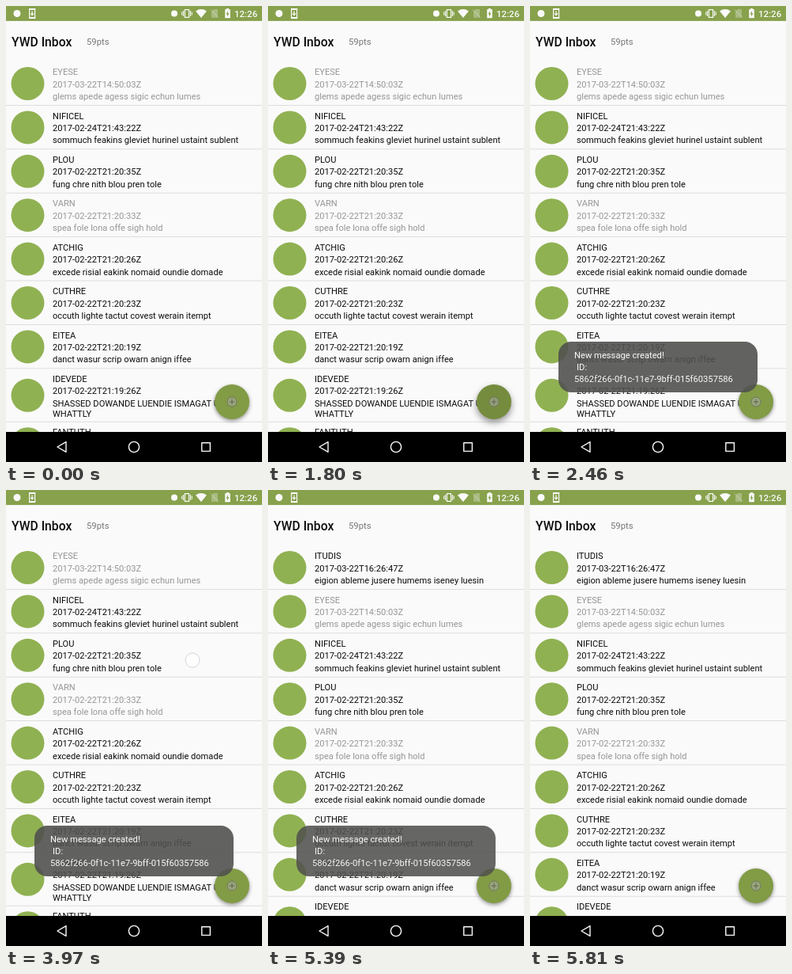
An HTML page with a canvas for the animation above (5860 ms loop, 324 px wide and 576 px high).

```html
<!DOCTYPE html>
<html lang="en">
<head>
<meta charset="utf-8">
<title>Inbox</title>
<style>
html, body { margin: 0; width: 100%; height: 100%; overflow: hidden; background: #fafafa; }
canvas { display: block; width: 100%; height: 100%; }
</style>
</head>
<body>
<canvas id="stage"></canvas>
<script>
const W = 324, H = 576, LOOP = 5860;
const LIST_TOP = 66, ROWS_TOP = 70, ROW_H = 55.4, NAV_TOP = 538;
const BG = '#fafafa', INK = '#0c0c0c', FADED = '#969696', GREEN = '#87a14c', LIGHT = '#fafafa';
const FONT = 'Roboto, sans-serif';

const canvas = document.getElementById('stage');
const ctx = canvas.getContext('2d');

const fresh = { name: 'ITUDIS', date: '2017-03-22T16:26:47Z', lines: ['eigion ableme jusere humems iseney luesin'] };
const rows = [
  { name: 'EYESE', date: '2017-03-22T14:50:03Z', lines: ['glems apede agess sigic echun lumes'], faded: true },
  { name: 'NIFICEL', date: '2017-02-24T21:43:22Z', lines: ['sommuch feakins gleviet hurinel ustaint sublent'] },
  { name: 'PLOU', date: '2017-02-22T21:20:35Z', lines: ['fung chre nith blou pren tole'] },
  { name: 'VARN', date: '2017-02-22T21:20:33Z', lines: ['spea fole lona offe sigh hold'], faded: true },
  { name: 'ATCHIG', date: '2017-02-22T21:20:26Z', lines: ['excede risial eakink nomaid oundie domade'] },
  { name: 'CUTHRE', date: '2017-02-22T21:20:23Z', lines: ['occuth lighte tactut covest werain itempt'] },
  { name: 'EITEA', date: '2017-02-22T21:20:19Z', lines: ['danct wasur scrip owarn anign iffee'] },
  { name: 'IDEVEDE', date: '2017-02-22T21:19:26Z', lines: ['SHASSED DOWANDE LUENDIE ISMAGAT UNDERIL', 'WHATTLY'] },
  { name: 'FANTUTH', date: '2017-02-22T21:19:20Z', lines: ['prent olame sigic'] }
];

const clamp = v => Math.max(0, Math.min(1, v));
const span = (t, a, b) => clamp((t - a) / (b - a));
const easeInOut = p => (1 - Math.cos(Math.PI * p)) / 2;
const easeIn = p => p * p;
const easeOut = p => 1 - (1 - p) ** 2;
const mix = (a, b, p) => a + (b - a) * p;

function text(str, x, y, size, color, weight = 400) {
  ctx.font = `${weight} ${size}px ${FONT}`;
  ctx.fillStyle = color;
  ctx.fillText(str, x, y);
}

function rect(x, y, w, h, color) {
  ctx.fillStyle = color;
  ctx.fillRect(x, y, w, h);
}

function disc(x, y, r, color) {
  ctx.fillStyle = color;
  ctx.beginPath();
  ctx.arc(x, y, r, 0, 2 * Math.PI);
  ctx.fill();
}

function arc(x, y, r, color, width, from = 0, to = 2 * Math.PI) {
  ctx.strokeStyle = color;
  ctx.lineWidth = width;
  ctx.beginPath();
  ctx.arc(x, y, r, from, to);
  ctx.stroke();
}

function path(points, closed) {
  ctx.beginPath();
  points.forEach(([x, y]) => ctx.lineTo(x, y));
  if (closed) ctx.closePath();
}

function line(points, color, width, closed = false) {
  ctx.strokeStyle = color;
  ctx.lineWidth = width;
  path(points, closed);
  ctx.stroke();
}

function layer(draw) {
  ctx.save();
  draw();
  ctx.restore();
}

function shadow(color, blur, dy) {
  const k = canvas.width / W;
  ctx.shadowColor = color;
  ctx.shadowBlur = blur * k;
  ctx.shadowOffsetY = dy * k;
}

function drawRow(row, top) {
  const height = ROW_H + (row.lines.length - 1) * 12;
  const color = row.faded ? FADED : INK;
  disc(27.5, top + height / 2 + 0.3, 21, '#90b152');
  text(row.name, 59, top + 17.2, 11.1, color);
  text(row.date, 59, top + 32.6, 11.1, color);
  row.lines.forEach((s, i) => text(s, 59, top + 48 + i * 13, 11.1, color));
  rect(0, top + height - 0.4, W, 0.8, '#d6d6d8');
  return top + height;
}

// Rows slide down first, then the new one fades into the gap.
function drawList(t) {
  const shift = easeInOut(span(t, 4570, 4820));
  const alpha = span(t, 4820, 4940);
  if (alpha > 0) layer(() => {
    ctx.globalAlpha = alpha;
    drawRow(fresh, ROWS_TOP);
  });
  let top = ROWS_TOP + shift * ROW_H;
  for (const row of rows) top = drawRow(row, top);
}

function drawSpinner(t) {
  const scale = 1 - span(t, 4550, 4700);
  if (t < 4010 || scale <= 0) return;
  const pull = easeInOut(span(t, 4010, 4290));
  const y = mix(48, 120, pull) - 14 * easeOut(span(t, 4300, 4500));
  ctx.translate(162, y);
  ctx.scale(scale, scale);
  layer(() => {
    shadow('rgba(0,0,0,.25)', 3, 1);
    disc(0, 0, 15.8, LIGHT);
  });
  const turn = -1.9 + (t - 4510) / 180;
  arc(0, 0, 7, '#bdbdbd', 2, turn, turn + 5.2 * Math.max(0.05, pull));
}

function drawFab(t) {
  const press = span(t, 1460, 1620) * (1 - span(t, 1800, 2010));
  const x = 286, y = 500, r = 22;
  layer(() => {
    shadow('rgba(0,0,0,.42)', 5 + 4 * press, 2 + 2 * press);
    disc(x, y, r, '#829b45');
  });
  if (press > 0) layer(() => {
    ctx.globalAlpha = 0.1 * press;
    disc(x, y, r * easeOut(span(t, 1460, 1700)), '#000');
  });
  disc(x, y, 6, 'rgba(175,178,172,.5)');
  arc(x, y, 6, '#70766a', 1);
  line([[x - 3.2, y], [x + 3.2, y]], '#666c60', 1.2);
  line([[x, y - 3.2], [x, y + 3.2]], '#666c60', 1.2);
}

function drawTouch(x, y, alpha) {
  if (alpha <= 0) return;
  layer(() => {
    ctx.globalAlpha = alpha;
    disc(x, y, 9, 'rgba(255,255,255,.75)');
    arc(x, y, 9, '#cfcfda', 0.9);
  });
}

function drawTouches(t) {
  if (t >= 1460 && t < 1620) drawTouch(287, 501, 0.6 * (1 - span(t, 1560, 1620)));
  if (t >= 3970 && t < 4340) {
    const y = mix(215, 345, easeInOut(span(t, 3970, 4290)));
    drawTouch(236, y, 1 - span(t, 4290, 4340));
  }
}

function drawToast(t) {
  const alpha = easeOut(span(t, 1960, 2460)) * (1 - easeIn(span(t, 5310, 5810)));
  if (alpha <= 0) return;
  layer(() => {
    ctx.globalAlpha = alpha;
    ctx.fillStyle = 'rgba(80,80,78,.89)';
    ctx.beginPath();
    ctx.roundRect(36, 424, 252, 64, 16);
    ctx.fill();
    text('New message created!', 56, 445.3, 11.2, LIGHT);
    text('ID:', 59, 460.3, 11.2, LIGHT);
    text('5862f266-0f1c-11e7-9bff-015f60357586', 56, 475.3, 11.2, LIGHT);
  });
}

function drawStatusBar() {
  rect(0, 0, W, 18.9, GREEN);
  disc(14, 9.5, 4.5, LIGHT);

  ctx.strokeStyle = LIGHT;
  ctx.lineWidth = 1.2;
  ctx.strokeRect(29.6, 3.6, 7, 11.8);
  rect(29, 3, 8.2, 2, LIGHT);
  rect(29, 14, 8.2, 2, LIGHT);
  line([[33.1, 6.5], [33.1, 11]], LIGHT, 1.3);
  line([[31, 9.3], [33.1, 11.6], [35.2, 9.3]], LIGHT, 1.2);

  disc(213, 9.5, 4, LIGHT);

  ctx.strokeRect(226.4, 4.6, 5.2, 9.8);
  for (const side of [-1, 1]) {
    line([[229 + side * 4.5, 6], [229 + side * 4.5, 13]], LIGHT, 1.1);
    line([[229 + side * 6.3, 7.5], [229 + side * 6.3, 11.5]], LIGHT, 1.1);
  }

  ctx.fillStyle = LIGHT;
  ctx.beginPath();
  ctx.moveTo(247, 15);
  ctx.lineTo(240, 6.4);
  ctx.quadraticCurveTo(247, 1.6, 254, 6.4);
  ctx.fill();

  ctx.fillStyle = 'rgba(250,250,250,.3)';
  path([[260, 7], [262.8, 4], [268, 4], [268, 14.8], [260, 14.8]], true);
  ctx.fill();
  line([[258.8, 4.4], [269, 14.8]], 'rgba(250,250,250,.4)', 1);

  rect(277.2, 4.2, 6.6, 11, LIGHT);
  rect(279, 3, 3, 1.4, LIGHT);
  ctx.fillStyle = GREEN;
  path([[281.2, 5.8], [278.5, 10.4], [280.2, 10.4], [279.8, 13.8], [282.5, 9.2], [280.8, 9.2]], true);
  ctx.fill();

  text('12:26', 289, 13.6, 11.5, LIGHT, 500);
}

function drawNavBar() {
  rect(0, NAV_TOP, W, H - NAV_TOP, '#000');
  ctx.lineJoin = 'round';
  line([[65, 557], [76, 550.6], [76, 563.4]], LIGHT, 1.4, true);
  arc(162, 557, 6.6, LIGHT, 1.4);
  ctx.strokeRect(247.8, 551.8, 10.6, 10.6);
}

function draw(t) {
  rect(0, 0, W, H, BG);
  layer(() => {
    ctx.beginPath();
    ctx.rect(0, LIST_TOP, W, NAV_TOP - LIST_TOP);
    ctx.clip();
    drawList(t);
    drawSpinner(t);
  });
  text('YWD Inbox', 7, 51, 15.7, INK, 500);
  text('59pts', 102, 49.3, 11.3, '#757575');
  drawFab(t);
  drawStatusBar();
  drawNavBar();
  drawToast(t);
  drawTouches(t);
}

function resize() {
  const ratio = window.devicePixelRatio || 1;
  canvas.width = Math.round(innerWidth * ratio);
  canvas.height = Math.round(innerHeight * ratio);
}

const start = performance.now();
function frame() {
  ctx.setTransform(canvas.width / W, 0, 0, canvas.height / H, 0, 0);
  draw((performance.now() - start) % LOOP);
  requestAnimationFrame(frame);
}

addEventListener('resize', resize);
resize();
frame();
</script>
</body>
</html>
```
